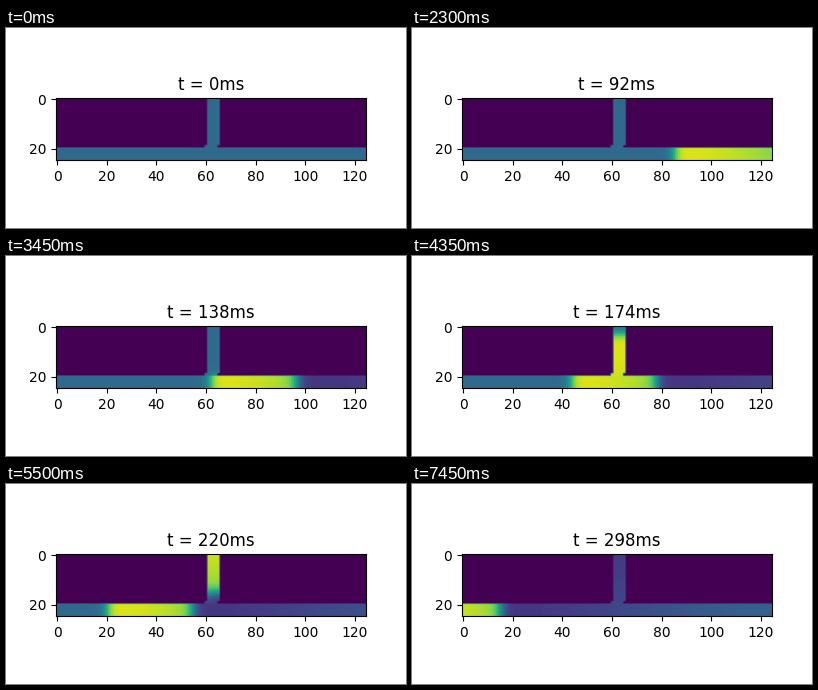
Write a matplotlib script that moves like this. It is 400 px wide and 200 px high and loops after 7.5 s.

```python
import matplotlib.pyplot as plt
import numpy as np
from matplotlib.animation import FuncAnimation

ROWS, COLS = 25, 125
FRAMES, INTERVAL, STEP = 150, 50, 2   # STEP: simulated ms per frame
REST, UNDERSHOOT, PEAK = 0.345, 0.155, 0.97
MS_PER_CELL = 1.97
DURATION = 68                         # front to repolarisation, in ms
JUNCTION_X, STRIP_TOP = 63.5, 20

rows, cols = np.mgrid[:ROWS, :COLS]
x, y = cols + 0.5, rows + 0.5

strip = rows >= STRIP_TOP
stem = (rows < STRIP_TOP) & (cols >= 61) & (cols <= 65)
stem[STRIP_TOP - 1] = (cols[0] >= 60) & (cols[0] <= 64)
tissue = strip | stem


def sigmoid(v):
    return 0.5 * (1 + np.tanh(v / 2))


def mix(a, b, amount):
    return a + (b - a) * amount


def arrival():
    """Time at which the wave front reaches each cell."""
    def along(pos):
        return 52 + MS_PER_CELL * (106 - pos)

    height = STRIP_TOP - y
    tilt = (JUNCTION_X - x) * np.exp(-np.abs(height) / 3)
    up = along(JUNCTION_X) + 5 + MS_PER_CELL * height + tilt
    return np.where(strip, along(x), up)


front = arrival()
edge_delay = 18 * np.exp(-(COLS - x) / 9)
tail = front + DURATION + np.where(strip, edge_delay, 3)


def potential(t):
    since_tail = t - tail
    plateau = PEAK - 0.16 * np.exp(np.minimum(since_tail, 0) / 28)
    recovery = mix(REST, UNDERSHOOT, np.exp(-(since_tail / 150) ** 2))
    wave = mix(plateau, recovery, sigmoid(since_tail / 2.5))
    level = mix(REST, wave, sigmoid((t - front) / 2.3))
    return np.where(tissue, level, 0.0)


fig, ax = plt.subplots(figsize=(4, 2), dpi=100)
image = ax.imshow(potential(0), vmin=0, vmax=1, cmap="viridis")
title = ax.set_title("t = 0ms")


def update(frame):
    t = frame * STEP
    image.set_data(potential(t))
    title.set_text(f"t = {t}ms")
    return image, title


anim = FuncAnimation(fig, update, frames=FRAMES, interval=INTERVAL,
                     repeat=True, repeat_delay=0)
plt.show()
```
